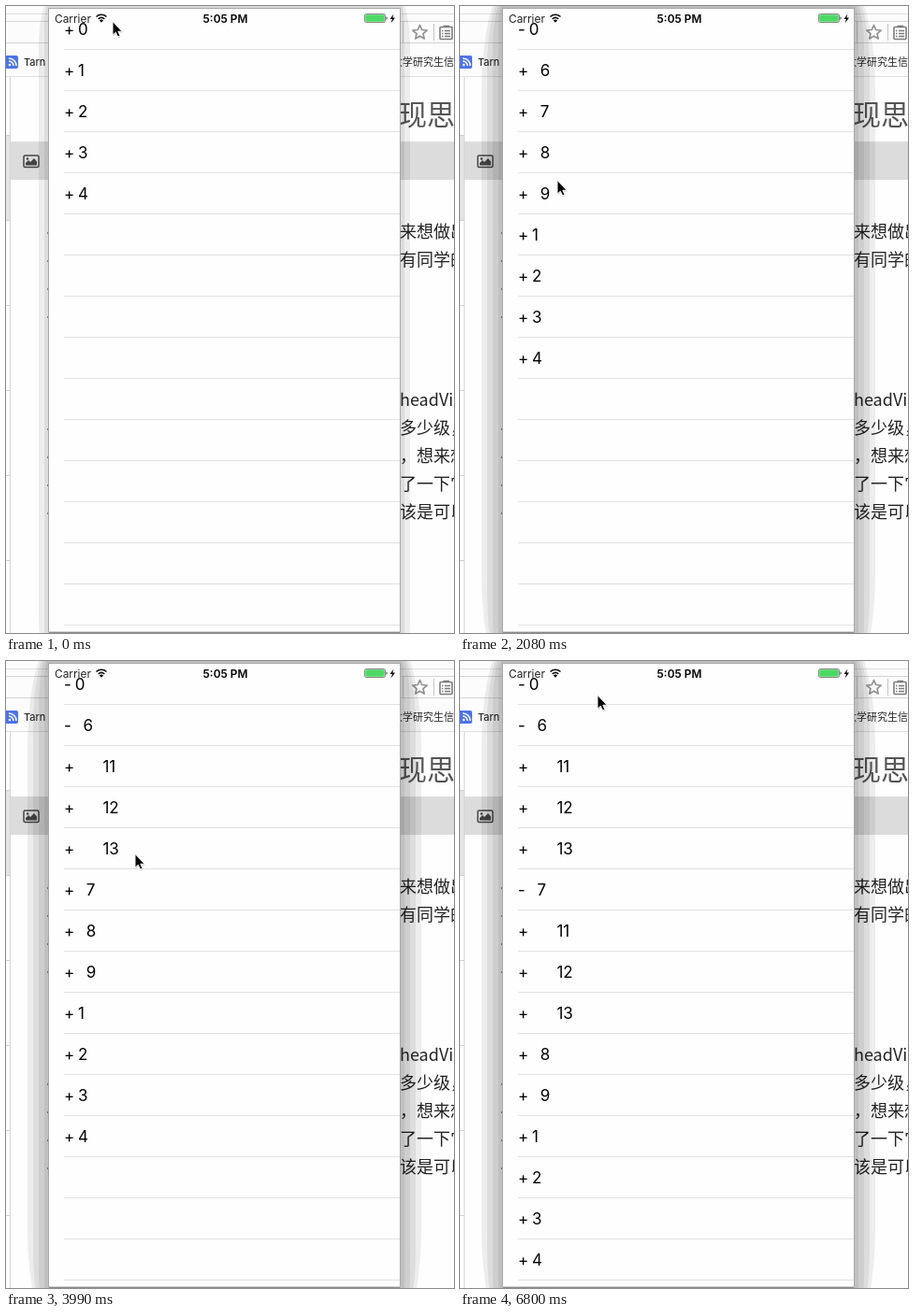
Recreate the animation shown at these times as an HTML page. Size 479 by 671 pixels, loop 8000 ms.

```html
<!DOCTYPE html>
<html lang="en">
<head>
<meta charset="utf-8">
<title>Expandable list</title>
<style>
  html, body { margin: 0; width: 100%; height: 100%; overflow: hidden; background: #fff; }
  svg { display: block; width: 479px; height: 671px; }
  text { font-family: Inter, Roboto, sans-serif; white-space: pre; }
  .cjk text { font-family: "Noto Sans CJK SC", "Noto Sans CJK", "Noto Sans", sans-serif; }
</style>
</head>
<body>
<svg viewBox="0 0 479 671">
  <!-- browser behind the phone -->
  <rect width="479" height="671" fill="#fefefe"/>
  <rect width="479" height="75" fill="#fcfcfc"/>
  <path d="M0 16.5H479M0 39.5H479M424.5 17V39" stroke="#d4d4d4"/>
  <path d="M0 8.5H479M0 75.5H479" stroke="#dedede"/>
  <path d="M457.5 19V37" stroke="#c4c4c4"/>
  <path id="star" fill="none" stroke="#929292" stroke-width="1.7" stroke-linejoin="round"/>
  <g fill="none" stroke="#7c7c7c" stroke-width="1.6">
    <rect x="464" y="22.5" width="13" height="13" rx="1"/>
    <path d="M467.5 21.5H474"/>
    <path d="M466 26.5H475M466 29.5H475M466 32.5H475" stroke-dasharray="1.5 1.5 6"/>
  </g>
  <rect x="-3" y="53" width="16" height="14" rx="2" fill="#4d73e8"/>
  <g fill="none" stroke="#fff" stroke-width="1.5">
    <path d="M3 59A5 5 0 0 1 8 64M3 56A8 8 0 0 1 11 64"/>
    <circle cx="4" cy="63" r=".6"/>
  </g>
  <text x="19" y="64" font-size="11" fill="#111">Tarn</text>
  <path d="M4.5 76V671" stroke="#d6d6d6"/>
  <rect y="138" width="4" height="92" fill="#e4e4e4"/>
  <path id="sidebar" stroke="#cfcfcf"/>
  <rect x="5" y="145" width="474" height="41" fill="#dcdcdc"/>
  <rect x="19" y="160" width="16" height="12.5" rx="1.5" fill="none" stroke="#444" stroke-width="1.5"/>
  <path d="M21 170.5V168L24 165 26 167 30 163 33 166.5V170.5Z" fill="#444"/>
  <circle cx="23" cy="163.5" r="1.3" fill="#444"/>
  <g id="article" class="cjk" fill="#222"></g>
  <g id="shadow"></g>

  <!-- phone -->
  <rect x="45.5" y="2.5" width="376" height="667.5" fill="#fefefe" stroke="#a8a8a8"/>
  <path d="M46 670.5H421" stroke="#8c8c8c"/>
  <path id="rules" stroke="#e1e1e3"/>
  <g id="rows" font-size="17"></g>
  <text x="52" y="17.5" font-size="11.9" fill="#222">Carrier</text>
  <path d="M96.5 11.5A8 8 0 0 1 107.5 11.5M98.7 13.8A5 5 0 0 1 105.3 13.8" fill="none" stroke="#111" stroke-width="1.6"/>
  <path d="M102 17.7L99.9 15.5A3 3 0 0 1 104.1 15.5Z"/>
  <text x="234.5" y="17.5" font-size="11.9" font-weight="600" text-anchor="middle">5:05 PM</text>
  <rect x="383.5" y="8.5" width="22" height="9" rx="1.8" fill="#fff" stroke="#666" stroke-width=".8"/>
  <rect x="384.3" y="9.3" width="20.4" height="7.4" rx="1" fill="#4cd964"/>
  <path d="M406.5 11.2A2 2 0 0 1 406.5 14.8Z" fill="#333"/>
  <path d="M414.5 8.5L410.5 14H413L411.5 18.5 416 12.5H413.3Z"/>

  <g id="cursor">
    <path d="M1 1V15.5L4.3 12.5 6.6 17.3 9 16.2 6.8 11.5H11.3Z" transform="translate(.6 1)" opacity=".2"/>
    <path d="M1 .5V15.2L4.3 12.2 6.6 17 9 15.9 6.8 11.2H11.3Z" stroke="#fff" stroke-linejoin="round"/>
  </g>
</svg>
<script>
const LOOP = 8000, TICK = 147.8, ROW = 44;
const $ = id => document.getElementById(id);
const range = (n, make) => Array.from({ length: n }, (_, i) => make(i));
const text = (x, y, s, attrs = "") => `<text x="${x}" y="${y}" ${attrs}>${s}</text>`;

$("star").setAttribute("d", "M" + range(10, i => {
  const r = i % 2 ? 3.7 : 8, a = i * Math.PI / 5;
  return `${442.5 + r * Math.sin(a)} ${28.5 - r * Math.cos(a)}`;
}).join("L") + "Z");
$("sidebar").setAttribute("d", range(6, i => `M0 ${138.5 + 91 * i}H4`).join(""));
$("rules").setAttribute("d", range(15, i => `M62 ${46.5 + ROW * i}H421`).join(""));

// Article lines peek out right of the phone; their first strokes show on the left.
const lines = ["来想做出", "有同学的", "", "", "", "", "headVi", "多少级，", "，想来想", "了一下它", "该是可以"];
$("article").innerHTML =
  text(413, 64, "大学研究生信", 'font-size="11"') +
  text(420, 127, "现思", 'font-size="30" fill="#555"') +
  lines.map((s, i) => {
    const y = 242 + 30 * i, startsLeft = i < 4 || i > 6;
    return text(421, y + 6, s, 'font-size="18"') +
      (startsLeft ? `<rect x="44.5" y="${y}" width="1" height="2"/>` : "");
  }).join("");

// Nested translucent bands; more of them as the window takes focus.
const shadowFor = focus => range(2 + focus, i => {
  const reach = 5 + 6 * i;
  return `<rect x="${46 - reach}" y="${-reach}" width="${375 + 2 * reach}" height="${700 + 2 * reach}"
    rx="${reach * 1.3}" ry="${reach * 5}" opacity=".065"/>`;
}).join("");

const node = (label, depth, children = []) => ({ label, depth, children });
const grandchildren = () => [11, 12, 13].map(n => node(n, 2));
const tree = [
  node(0, 0, [node(6, 1, grandchildren()), node(7, 1, grandchildren()), node(8, 1), node(9, 1)]),
  ...[1, 2, 3, 4].map(n => node(n, 0))];

// Each tap toggles one item: [time, label]
const taps = [[1190, 0], [3260, 6], [4580, 7], [5910, 0], [6800, 0]];
const isOpen = (label, t) => taps.filter(([time, tapped]) => time <= t && tapped === label).length % 2 === 1;
const visible = (items, t) => items.flatMap(item =>
  [item, ...(isOpen(item.label, t) ? visible(item.children, t) : [])]);

const rowsAt = t => visible(tree, t).map(({ label, depth }, i) => {
  const y = 31 + ROW * i, open = isOpen(label, t);
  const x = 77 + 4.4 * depth * (depth + 1) - (open ? 3.2 : 0);
  return text(62, y, open ? "-" : "+") + text(x, y, label);
}).join("");

// Cursor strokes: [start, end, x, y, easing]
const smooth = p => p * p * (3 - 2 * p);
const easeOut = p => Math.sin(p * Math.PI / 2);
const moves = [
  [0, 290, 113, 18, smooth],
  [440, 890, 113, 42, smooth],
  [1330, 1780, 104, 125, smooth],
  [1930, 2380, 102, 256, easeOut],
  [2380, 3110, 119, 57, easeOut],
  [3260, 4280, 142, 242, smooth],
  [4720, 5020, 159, 97, smooth],
  [5020, 5610, 146, 36, easeOut]];

function cursorAt(t) {
  let x = 113, y = 16;
  for (const [start, end, toX, toY, ease] of moves) {
    const p = ease(Math.min(1, Math.max(0, (t - start) / (end - start))));
    x += (toX - x) * p;
    y += (toY - y) * p;
  }
  return [Math.round(x), Math.round(y)];
}

const shown = {};
function show(id, markup) {
  if (shown[id] !== markup) $(id).innerHTML = shown[id] = markup;
}

function draw() {
  const t = performance.now() % LOOP;
  const tick = Math.floor((t + 10) / TICK);
  show("shadow", shadowFor(Math.min(2, tick)));
  show("rows", rowsAt(t));
  $("cursor").setAttribute("transform", `translate(${cursorAt(tick * TICK)})`);
  requestAnimationFrame(draw);
}
draw();
</script>
</body>
</html>
```
